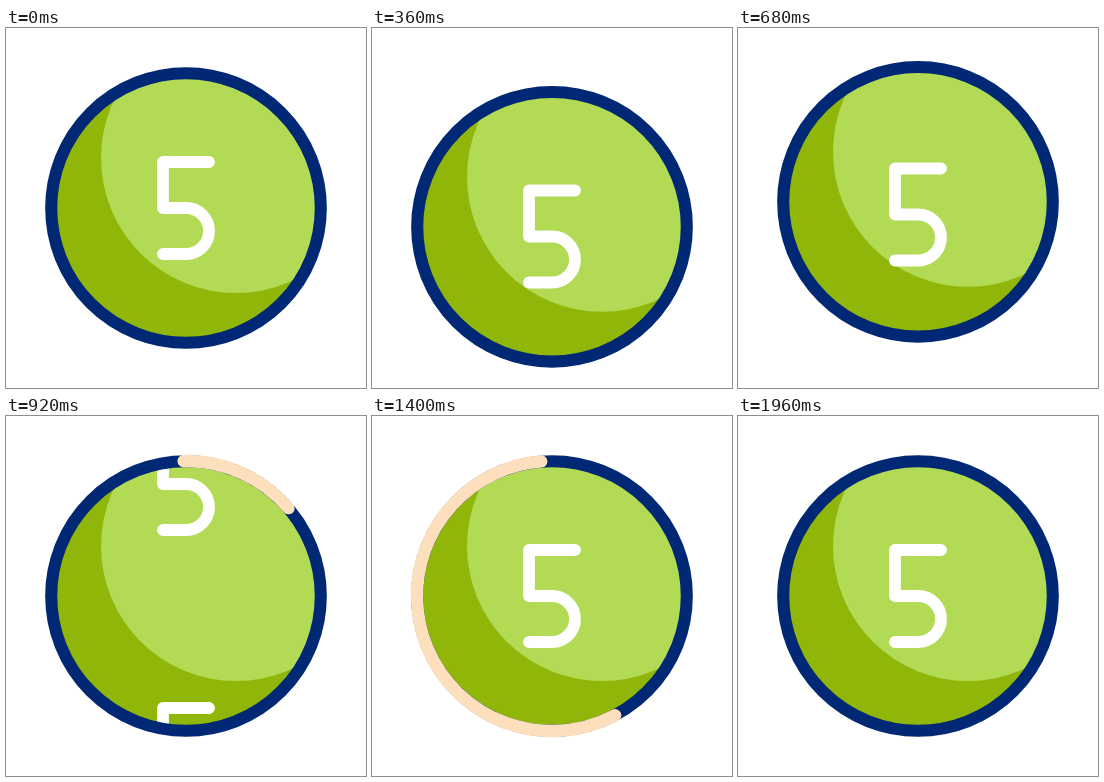
An HTML page that plays this animation: 360 px wide and 360 px high, repeating every 2 s.

```html
<!DOCTYPE html>
<html lang="en">
<head>
<meta charset="utf-8">
<title>Rolling five</title>
<style>
  html, body { margin: 0; height: 100%; overflow: hidden; background: #fff; }
  svg { display: block; width: 100%; height: 100%; }
</style>
</head>
<body>
<svg viewBox="0 0 360 360" fill="none" stroke-linecap="round" stroke-linejoin="round">
  <defs>
    <clipPath id="inside"><circle cx="180" cy="180" r="131"/></clipPath>
    <path id="five" d="M203 134H157V180H180a23 23 0 0 1 0 46H157" stroke="#fff" stroke-width="11.8"/>
  </defs>
  <g id="ball">
    <g clip-path="url(#inside)">
      <circle cx="180" cy="180" r="131" fill="#8fb608"/>
      <circle cx="230" cy="130" r="135" fill="#b2da54"/>
      <g id="reel">
        <use href="#five"/>
        <use href="#five" y="270"/>
      </g>
    </g>
    <circle cx="180" cy="180" r="134.8" stroke="#002875" stroke-width="12.1"/>
    <circle id="sweep" cx="180" cy="180" r="135" stroke="#fddfbd" stroke-width="12.4"
      pathLength="360" transform="rotate(-91 180 180)"/>
  </g>
</svg>
<script>
const LOOP = 2000, STEP = 40;
const [ball, reel, sweep] = ['ball', 'reel', 'sweep'].map(id => document.getElementById(id));

const smooth = p => p * p * (3 - 2 * p);
const quad = p => p < .5 ? 2 * p * p : 1 - 2 * (1 - p) ** 2;

// keys: [time, value, easing into this key]
function track(keys, t) {
  const i = keys.findIndex(k => k[0] > t);
  if (i < 0) return keys[keys.length - 1][1];
  if (!i) return keys[0][1];
  const [t0, v0] = keys[i - 1], [t1, v1, ease = smooth] = keys[i];
  return v0 + (v1 - v0) * ease((t - t0) / (t1 - t0));
}

const ballY = [[140, 0], [360, 18.8], [560, -17.5], [760, 0]];
const digitY = [[140, 0], [360, 28.5], [560, -25.7], [760, 24], [1123, -326, quad], [1360, -270]];
const head = [[760, 0], [1440, 360]];
const tail = [[1040, 0], [1840, 360]];

function draw(now) {
  const t = Math.floor(now % LOOP / STEP) * STEP;
  const y = track(ballY, t);
  ball.setAttribute('transform', `translate(0 ${y})`);
  reel.setAttribute('transform', `translate(0 ${track(digitY, t) - y})`);

  const from = track(tail, t), length = track(head, t) - from;
  sweep.style.display = length > 0 ? '' : 'none';
  sweep.setAttribute('stroke-dasharray', `${length} 720`);
  sweep.setAttribute('stroke-dashoffset', -from);
}

const start = performance.now();
function tick() {
  draw(performance.now() - start);
  requestAnimationFrame(tick);
}
tick();
</script>
</body>
</html>
```
